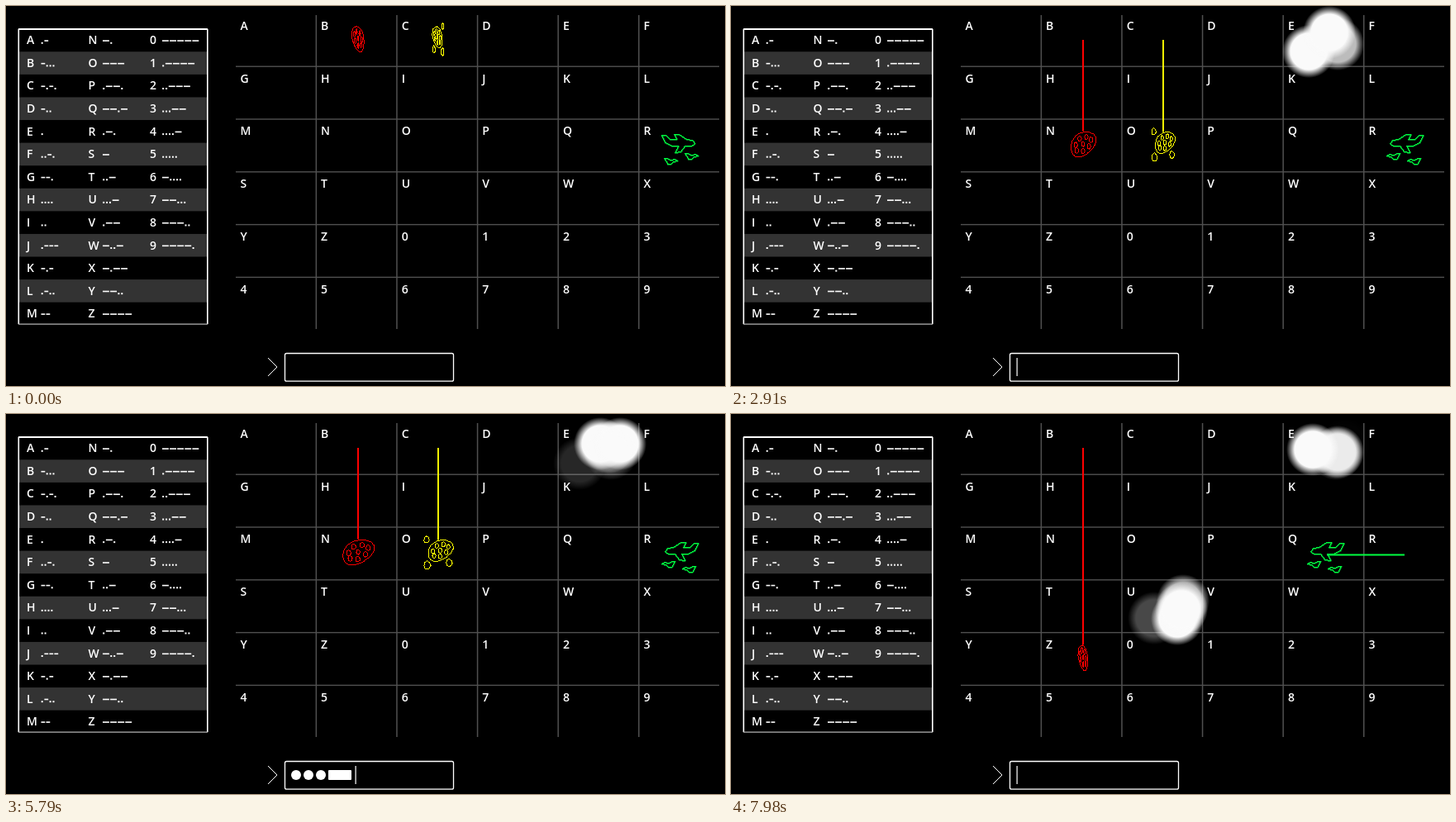
These frames come from a looping animation (870x460 px, 8 s). An HTML page with a canvas:

```html
<!DOCTYPE html>
<html lang="en">
<head>
<meta charset="utf-8">
<title>Morse defence</title>
<style>
  html, body { margin: 0; width: 100%; height: 100%; overflow: hidden; background: #000; }
  canvas { display: block; }
</style>
</head>
<body>
<canvas id="stage" width="870" height="460"></canvas>
<script>
const LOOP = 8000;
const CELL_W = 97.6, CELL_H = 63.8;
const FONT = '600 14px "Open Sans", "Noto Sans", sans-serif';
const KEYS = 'ABCDEFGHIJKLMNOPQRSTUVWXYZ0123456789';
// Chart columns as displayed; "=" marks the longer dash
const CHART = [
  '.- -... -.-. -.. . ..-. --. .... .. .--- -.- .-.. --',
  '=. === .==. ==.= .=. = ..= ...= .== =..= =.== ==.. ====',
  '===== .==== ..=== ...== ....= ..... =.... ==... ===.. ====.'
].map(s => s.split(' '));

const ctx = document.getElementById('stage').getContext('2d');
const ramp = (t, from, len) => Math.min(1, Math.max(0, (t - from) / len));
const path = s => s.split(' ').map(p => p.split(',').map(Number));
const shift = (pts, dx, dy) => pts.map(([x, y]) => [x + dx, y + dy]);

function layer(w, h) {
  const c = document.createElement('canvas');
  c.width = w;
  c.height = h;
  return c;
}

function morse(g, code, x, y) {
  for (const mark of code) {
    if (mark === '.') {
      g.fillRect(x + 0.7, y + 2.5, 2, 2);
      x += 3.9;
    } else {
      const step = mark === '=' ? 9.1 : 6;
      g.fillRect(x + 0.5, y, step - 1.2, 1.6);
      x += step;
    }
  }
}

function drawBoard() {
  const c = layer(870, 460), g = c.getContext('2d');
  g.fillStyle = '#000';
  g.fillRect(0, 0, 870, 460);

  // Code chart
  const row = 27.58;
  g.fillStyle = '#333';
  for (let i = 1; i < 13; i += 2) g.fillRect(16, 27.7 + i * row, 227, row);
  g.fillStyle = '#fff';
  g.fillRect(15, 27, 229, 2);
  g.fillRect(14.5, 28, 1.6, 357);
  g.fillRect(243, 28, 1.6, 357);
  g.fillStyle = '#bbb';
  g.fillRect(15, 384.5, 229, 1.2);
  g.font = FONT;
  g.fillStyle = '#fff';
  CHART.forEach((codes, col) => codes.forEach((code, i) => {
    const x = 25 + col * 74.5, y = 41.3 + i * row;
    g.fillText(KEYS[col * 13 + i], x, y + 5);
    morse(g, code, x + (col < 2 ? 17 : 14.5), y);
  }));

  // Sector grid
  g.fillStyle = '#505050';
  for (let i = 1; i < 6; i++) {
    g.fillRect(277 + i * CELL_W, 11, 1.5, 380);
    g.fillRect(278, 8.7 + i * CELL_H, 585, 1.4);
  }
  g.fillStyle = '#fff';
  [...KEYS].forEach((k, i) =>
    g.fillText(k, 283.5 + (i % 6) * CELL_W, 28.7 + Math.floor(i / 6) * CELL_H));

  // Prompt
  g.strokeStyle = '#fff';
  g.lineWidth = 1.3;
  g.beginPath();
  g.roundRect(337.5, 420.5, 204, 33.7, 2);
  g.stroke();
  g.lineWidth = 1;
  g.beginPath();
  g.moveTo(317, 426);
  g.lineTo(328, 437);
  g.lineTo(317, 448);
  g.stroke();
  return c;
}

// Hard-edged closed outlines, squeezed sideways by sx
function plot(shapes, color, cx, cy, sx, pen = 1) {
  ctx.fillStyle = color;
  for (const pts of shapes) {
    pts.forEach(([x, y], i) => {
      const [u, v] = pts[(i + 1) % pts.length];
      const n = Math.ceil(Math.max(Math.abs(u - x) * Math.abs(sx), Math.abs(v - y), 1));
      for (let k = 0; k < n; k++) {
        const px = cx + sx * (x + (u - x) * k / n), py = cy + y + (v - y) * k / n;
        ctx.fillRect(Math.round(px), Math.round(py), pen, pen);
      }
    });
  }
}

function blob(x, y, rx, ry = rx, tilt = 0, n = 8) {
  return Array.from({ length: n }, (_, i) => {
    const a = i * Math.PI * 2 / n, r = 1 + 0.05 * Math.sin(3 * a + 1);
    const p = r * rx * Math.cos(a), q = r * ry * Math.sin(a);
    return [x + p * Math.cos(tilt) - q * Math.sin(tilt), y + p * Math.sin(tilt) + q * Math.cos(tilt)];
  });
}

// Tilted boulder with a ring of craters
function boulder(x, y, size) {
  const shapes = [blob(x, y, 22.5 * size, 14 * size, -0.36, 16), blob(x, y, 2.5, 3)];
  for (const [u, v] of blob(x, y, 14 * size, 8 * size, -0.36, 7)) shapes.push(blob(u, v, 3 * size, 3.4 * size));
  return shapes;
}

const rock = boulder(0, 0, 1);
const swarm = [...boulder(3, -3, 0.85), blob(-17, -16, 4), blob(-16, 15, 5), blob(16, 12, 4.5)];
const wing = path('-8,-3 -4,-3 0,-1 5,-2 8,0 3,1 0,4 -4,4 -6,0');
const jet = [
  path('-22,-16 -17,-16 -12,-11 -4,-11 -7,-17 -1,-17 8,-11 15,-10 18,-6 14,-3 6,-3 1,4 -6,5 -2,-3 -9,-3 -18,-7'),
  shift(wing, -11, 15), shift(wing, 14, 9)
];

// Each shot: time, typed code, and where its smoke puffs rise in turn
const SHOTS = [
  { at: 1700, code: '.', puffs: path('734,46 699,55 724,32 694,60 729,40 719,36 743,36 732,48 734,46 704,43') },
  { at: 6070, code: '...-', puffs: path('512,247 547,226 540,248 545,236') }
];
const MOVE_DELAY = 300, MOVE_LEN = 450, FOCUS_DELAY = 760;
const PUFF_GAP = 660, PUFF_LIFE = 3000, PUFF_FADE = 1500;

const puff = layer(64, 64);
{
  const g = puff.getContext('2d'), fill = g.createRadialGradient(32, 32, 22, 32, 32, 32);
  fill.addColorStop(0, 'rgba(250,250,250,1)');
  fill.addColorStop(1, 'rgba(250,250,250,0)');
  g.fillStyle = fill;
  g.fillRect(0, 0, 64, 64);
}

function drawSmoke(t, { at, puffs }) {
  puffs.forEach(([x, y], i) => {
    const age = t - at - (i - 1) * PUFF_GAP;
    ctx.globalAlpha = ramp(t, at, 250) * ramp(age, 0, 500) * (1 - ramp(age, PUFF_LIFE - PUFF_FADE, PUFF_FADE));
    if (ctx.globalAlpha > 0) ctx.drawImage(puff, x - 32, y - 32);
  });
  ctx.globalAlpha = 1;
}

function drawPrompt(t) {
  const next = SHOTS.find(s => s.at > t) || { at: Infinity, code: '' };
  const last = SHOTS.filter(s => s.at <= t).pop() || { at: -640 };
  const keyTime = i => next.at - 450 - (next.code.length - 1 - i) * 370;
  let since = last.at + FOCUS_DELAY, x = 345;
  ctx.fillStyle = '#fff';
  [...next.code].forEach((mark, i) => {
    if (t < keyTime(i)) return;
    since = keyTime(i);
    const dot = mark === '.', w = dot ? 12 : 28;
    ctx.beginPath();
    ctx.roundRect(x, 431, w, 12, dot ? 6 : 1);
    ctx.fill();
    x += w + (dot ? 3 : 4);
  });
  if (t >= since && (t - since) % 1000 < 500) ctx.fillRect(x + 0.5, 426, 1.2, 22);
}

function drawFalling(shapes, color, x, y, moved, spin) {
  const end = y + moved * CELL_H * 2;
  plot(shapes, color, x, end, spin);
  ctx.fillRect(x - 0.5, 41, 2, Math.max(0, end - 15 - 41));
}

const board = drawBoard();

function draw(t) {
  ctx.drawImage(board, 0, 0);
  const [first, second] = SHOTS.map(s => ramp(t, s.at + MOVE_DELAY, MOVE_LEN));
  const spin = Math.cos((110 + t * 0.225) * Math.PI / 180);

  drawFalling(rock, '#f00', 425.5, 39, first + second, spin);
  if (second < 0.5) drawFalling(swarm, '#ff0', 522.5, 40, first + second, spin * 0.93);

  const jetX = 815 - 96 * second;
  plot(jet, '#00ff41', jetX, 172, first > 0 ? -1 : 1, 1.4);
  if (second > 0) ctx.fillRect(jetX + 2, 169.5, Math.max(0, 813 - jetX), 2);

  SHOTS.forEach(s => drawSmoke(t, s));
  drawPrompt(t);
}

const start = performance.now();
function tick() {
  draw((performance.now() - start) % LOOP);
  requestAnimationFrame(tick);
}
tick();
</script>
</body>
</html>
```
